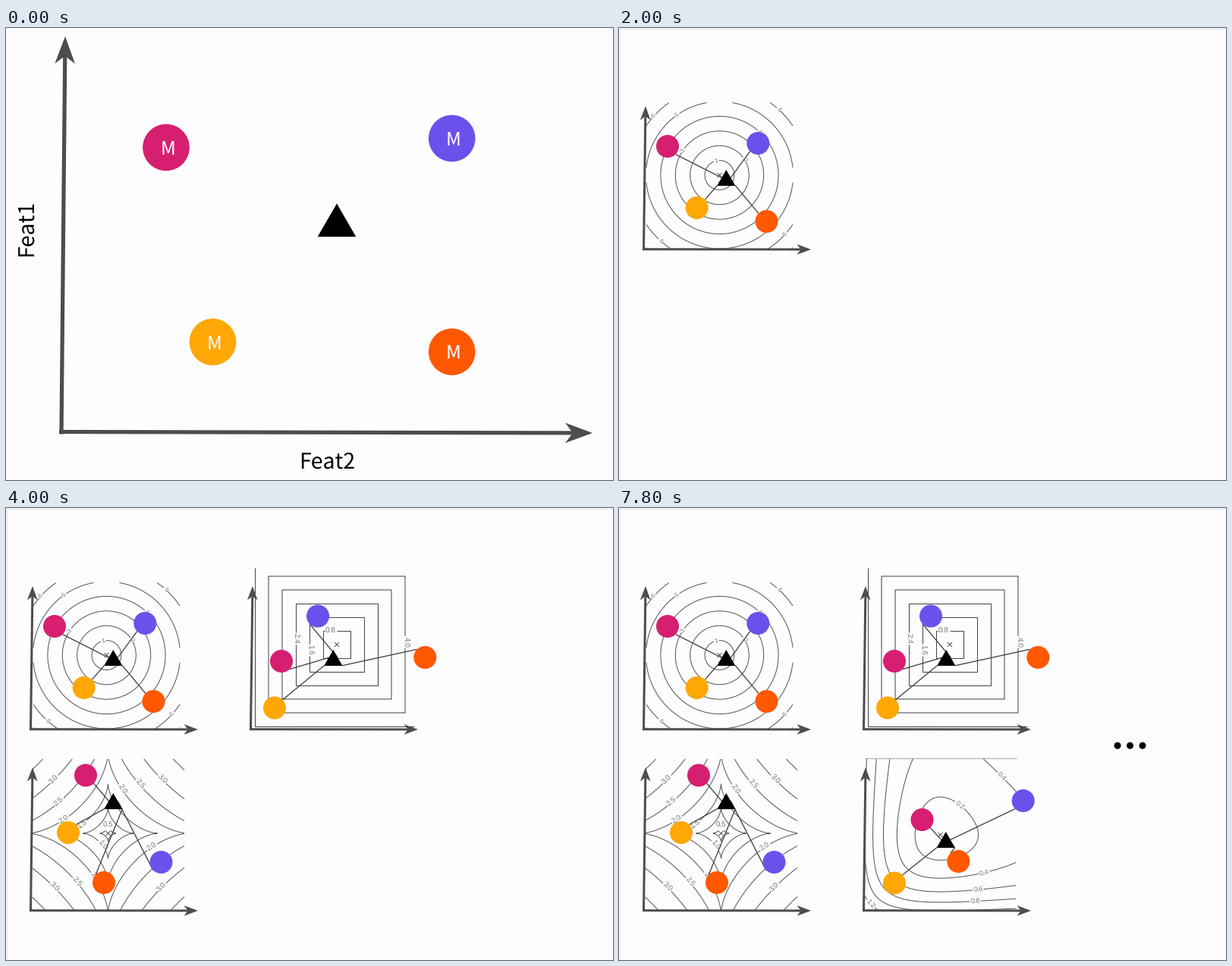
These frames come from a looping animation (800 by 596 pixels, 9 s). A matplotlib script:

```python
import numpy as np
import matplotlib.pyplot as plt
from matplotlib.animation import FuncAnimation
from matplotlib.patches import Circle, Polygon, Rectangle

W, H, DPI = 800, 596, 100
PT = 72 / DPI  # points per pixel

BG = "#fdfcfe"
AXIS = "#4d4d4d"
LINK = "#404040"
RING = "#555555"
TEAL = "#10b0b6"
PINK, PURPLE, YELLOW, ORANGE = "#d61f71", "#6b51ec", "#ffa704", "#ff5800"
COLORS = (PINK, PURPLE, YELLOW, ORANGE)
# Side of each circle where its link starts: right/left, below/above
CORNERS = ((1, 1), (-1, 1), (1, -1), (-1, -1))

plt.rcParams["font.family"] = "Liberation Sans"
plt.rcParams["text.hinting"] = "none"
fig = plt.figure(figsize=(W / DPI, H / DPI), dpi=DPI, facecolor=BG)


def layer():
    """Transparent axes over the whole stage, measured in pixels."""
    ax = fig.add_axes([0, 0, 1, 1])
    ax.set_xlim(0, W)
    ax.set_ylim(H, 0)
    ax.axis("off")
    return ax


def line(ax, p, q, color=LINK, width=1.3, z=5):
    ax.plot([p[0], q[0]], [p[1], q[1]], color=color, lw=width * PT,
            solid_capstyle="butt", zorder=z)


def arrow(ax, tail, tip, size, width):
    """Shaft with a swept-back head whose wings lie `size` behind the tip."""
    tail, tip = np.array(tail, float), np.array(tip, float)
    along = (tip - tail) / np.hypot(*(tip - tail))
    side = np.array([-along[1], along[0]]) * size * 0.37
    base, notch = tip - along * size, tip - along * size * 0.72
    line(ax, tail, notch, AXIS, width, 4)
    ax.add_patch(Polygon([tip, base + side, notch, base - side],
                         fc=AXIS, lw=0, zorder=4))


def dot(ax, center, r, color):
    ax.add_patch(Circle(center, r, fc=color, lw=0, zorder=6))


def triangle(ax, tip, half):
    x, y = tip
    foot = y + half * 1.73
    ax.add_patch(Polygon([tip, (x - half, foot), (x + half, foot)],
                         fc="black", lw=0, zorder=7))


def link(ax, spot, r, corner, tip, half, **style):
    """Join a circle's corner to the triangle: its side's middle or its foot."""
    sx, sy = corner
    start = spot[0] + sx * r * 0.71, spot[1] + sy * r * 0.71
    reach = half / 2 if sy > 0 else half
    line(ax, start, (tip[0] - sx * reach, tip[1] + reach * 1.73), **style)


def word(ax, x, y, text, size, color="black", angle=0):
    ax.text(x, y, text, family="Noto Sans CJK JP", fontsize=size * PT,
            color=color, rotation=angle, rotation_mode="anchor",
            ha="center", va="baseline", zorder=8)


def contours(ax, field, step, box, center, tags, fmt="%.1f", size=9.6, color=RING):
    """Level lines of `field` around `center`, tagged at offsets from it."""
    left, right, top, bottom = box
    cx, cy = center
    X, Y = np.meshgrid(np.arange(left, right + 0.1, 0.5),
                       np.arange(top, bottom + 0.1, 0.5))
    rings = ax.contour(X, Y, field(X - cx, Y - cy), levels=step * np.arange(1, 8),
                       colors=color, linewidths=PT, zorder=1)
    ax.clabel(rings, manual=[(cx + x, cy + y) for x, y in tags], fmt=fmt,
              fontsize=size * PT, colors="#777777", inline_spacing=1, zorder=2)
    for s in (-3, 3):
        line(ax, (cx - 3, cy - s), (cx + 3, cy + s), RING, 1, 3)


def panel(col, row, tip, spots):
    ax = layer()
    x, y = 290 * col, 239 * row
    arrow(ax, (x + 32.5, y + 293), (x + 35, y + 103), 18.5, 3)
    arrow(ax, (x + 31, y + 291.7), (x + 253, y + 292), 18.5, 3)
    for spot, color, corner in zip(spots, COLORS, CORNERS):
        link(ax, spot, 15, corner, tip, 12)
        dot(ax, spot, 15, color)
    triangle(ax, tip, 12.2)
    return ax


# Opening plot
intro, links = layer(), layer()
links.set_zorder(-1)
arrow(intro, (73, 535.5), (78, 11), 36, 5.2)
arrow(intro, (70, 532.5), (773, 534), 36, 5.2)
word(intro, 423, 580.5, "Feat2", 28.5)
word(intro, 36, 264, "Feat1", 28.5, angle=90)
peak = (436, 231.5)
means = [(211, 157.5), (587.7, 145.5), (272.5, 414), (587.7, 427)]
for mean, color, corner in zip(means, COLORS, CORNERS):
    nearest = color == YELLOW
    link(links, mean, 30.8, corner, peak, 25.3,
         color=TEAL if nearest else LINK, width=2.8 if nearest else 1.3)
    dot(intro, mean, 30.8, color)
    word(intro, mean[0] + 2.3, mean[1] + 9.5, "M", 24.5, "#fdf6fb")
triangle(intro, peak, 25.3)

# Euclidean distance
euclid = panel(0, 0, (141.3, 187),
               [(64, 156), (183.3, 152), (102.7, 237), (194.5, 255)])
turns = [103, 32, 146, 47, 125] + [48 + 90 * k for k in range(4)]
radii = [19.4 * min(k, 6) for k in range(1, 10)]
contours(euclid, lambda x, y: np.hypot(x, y) / 19.4, 1,
         (36, 229), (0, 0), (0, 0), ()) if False else contours(
    euclid, lambda x, y: np.hypot(x, y) / 19.4, 1, (36, 229, 98.5, 291.5),
    (132.5, 194),
    [(r * np.cos(np.radians(t)), -r * np.sin(np.radians(t)))
     for r, t in zip(radii, turns)], "%d", 8.5)

# Chebyshev distance
cheby = panel(1, 0, (431.3, 187),
              [(363, 202), (411, 142.5), (354, 263.5), (552.3, 197)])
contours(cheby, lambda x, y: np.maximum(abs(x), abs(y)) * 0.8 / 18, 0.8,
         (327.5, 538, 79, 288.5), (436, 180),
         [(-8, -18), (-36, 7), (-54, -8), (90, -3)], size=10, color="#444444")

# Fractional power distance, tagged in opposite pairs
power = panel(0, 1, (141.3, 376),
              [(105, 352.5), (204.5, 467), (82, 428), (129, 494)])
pairs = [(19.5, -59), (58, 18), (40, -63), (64, 41), (71, 71), (71, -71)]
contours(power, lambda x, y: (abs(x / 33) ** 0.65 + abs(y / 33) ** 0.65) ** 0.922,
         0.5, (34.5, 235, 331, 530.5), (134.5, 429),
         [(s * x, s * y) for x, y in pairs for s in (1, -1)]
         + [(-34, -12), (-9.5, 17), (1.5, -11)])

# Distance relative to the sum of the values
ratio = panel(1, 1, (430.8, 427),
              [(399.5, 411), (532.7, 386), (363, 494.5), (447.3, 466)])
contours(ratio, lambda x, y: np.hypot(x / (x + 200), y / (200 - y)), 0.2,
         (323.5, 523.5, 331, 531), (423.5, 431),
         [(26, -40), (82, -79), (58, 50), (50, 73), (46, 88), (-92, 91)], size=9.2)
line(ratio, (324, 330.3), (524, 330.3), "#a8a8a8", 1, 1)

more = layer()
for k in range(3):
    dot(more, (657 + 16.5 * k, 313.3), 4.5, "black")

border = layer()
border.add_patch(Rectangle((0.5, 0.5), W - 1, H - 1, fill=False,
                           ec="#e4e3e5", lw=PT, zorder=9))

# Layers that join one by one, a second apart
BUILD = (euclid, cheby, power, ratio, more)


def draw(second):
    intro.set_visible(second < 2)
    links.set_visible(second == 1)
    border.set_visible(second >= 1)
    for start, ax in enumerate(BUILD, 2):
        ax.set_visible(second >= start)
    return [intro, links, border, *BUILD]


anim = FuncAnimation(fig, draw, frames=9, interval=1000, repeat=True,
                     repeat_delay=0, blit=False)
plt.show()
```
